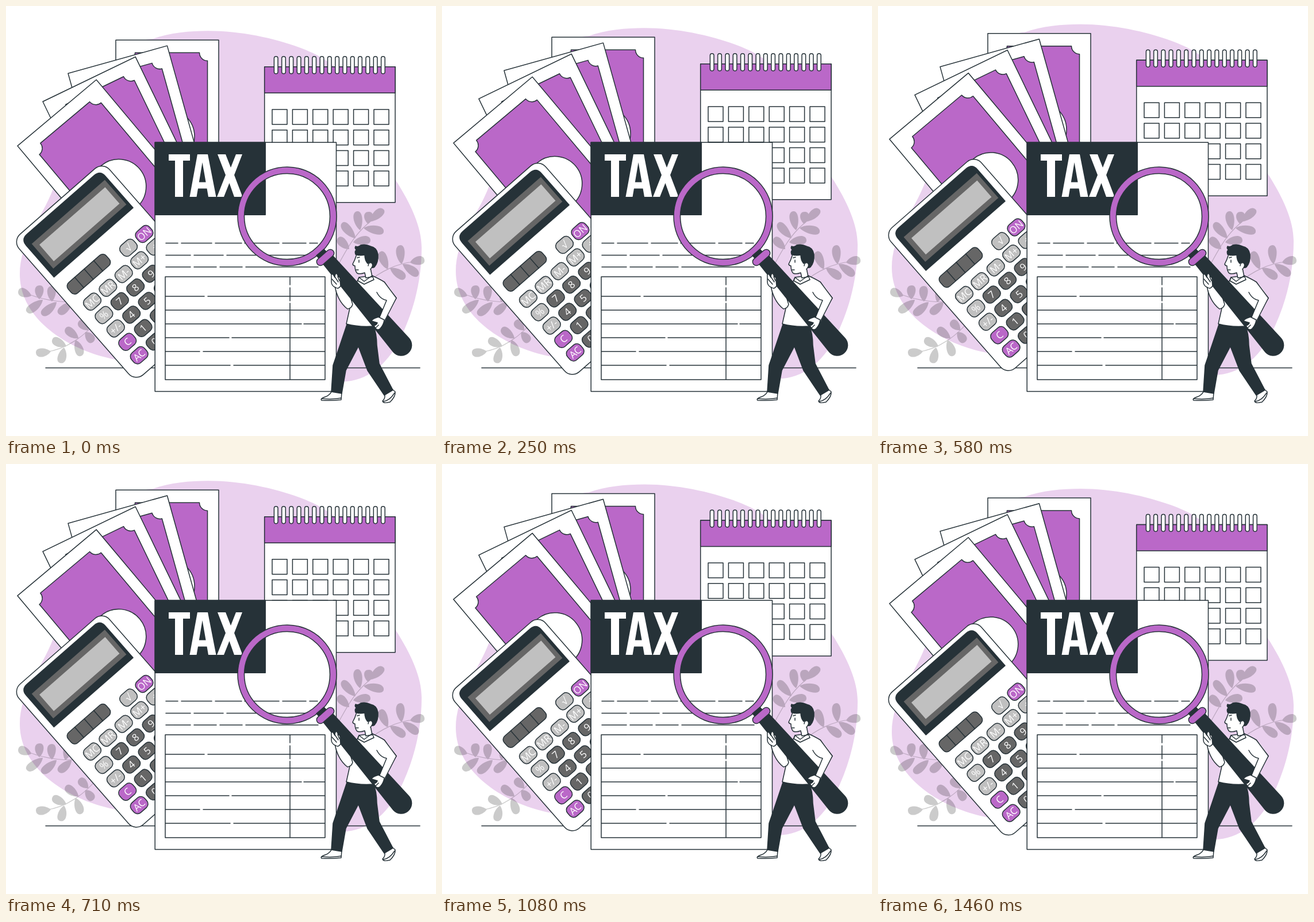
Recreate the animation shown at these times as an HTML page. Size 748 px wide and 748 px high, loop 1.5 s.

```html
<!DOCTYPE html>
<html lang="en">
<head>
<meta charset="utf-8">
<title>Tax</title>
<style>
  html, body { margin: 0; width: 100%; height: 100%; overflow: hidden; background: #fff; }
  svg { display: block; width: 100%; height: 100%; stroke: #263238; stroke-width: 1.5; fill: #fff; stroke-linejoin: round; stroke-linecap: round; }
  text { font: 17px "Open Sans", "Noto Sans", sans-serif; text-anchor: middle; stroke: none; fill: #fff; }
  .bare { stroke: none; }
  .line { fill: none; }
  .dark { fill: #263238; }
  .main { fill: #ba68c8; }
  .soft { fill: #ead1ee; stroke: none; }
  .mid { fill: #666; }
  .pale { fill: #c0c0c0; }
  .plant { stroke: #000; fill: #000; opacity: .2; stroke-width: 1.2; }
  .plant .leaf { stroke: none; }
</style>
</head>
<body>
<svg id="stage" viewBox="0 0 748 748"></svg>
<script>
const range = (n, draw) => Array.from({ length: n }, (_, i) => draw(i)).join('');
const rect = (x, y, w, h, cls = '', r = 0) =>
  `<rect x="${x}" y="${y}" width="${w}" height="${h}" rx="${r}" class="${cls}"/>`;
const path = (d, cls = '') => `<path d="${d}" class="${cls}"/>`;
const group = (transform, body) => `<g transform="${transform}">${body}</g>`;
const floating = body => `<g class="float">${body}</g>`;

// A leaf runs from its base on the stem to its tip.
function leaf([x, y, tipX, tipY]) {
  const len = Math.hypot(tipX - x, tipY - y);
  const angle = Math.atan2(tipY - y, tipX - x) * 180 / Math.PI;
  return group(`translate(${x} ${y}) rotate(${angle})`,
    path(`M0 0C${len * .3} -10 ${len} -12 ${len} 0C${len} 10 ${len * .3} 8 0 0Z`, 'leaf'));
}
const plant = (stem, leaves) =>
  `<g class="plant">${path(stem, 'line')}${leaves.map(leaf).join('')}</g>`;

const plants = [
  plant('M575 455C590 430 603 397 640 370', [
    [633, 375, 657, 354], [630, 379, 632, 358], [616, 390, 611, 357], [622, 386, 657, 393],
    [608, 404, 585, 377], [604, 411, 634, 407], [597, 423, 578, 403]]),
  plant('M630 480C650 463 680 447 710 445', [
    [703, 446, 728, 442], [688, 449, 686, 416], [690, 449, 717, 469], [664, 458, 652, 427],
    [668, 456, 694, 474]]),
  plant('M140 512C110 518 70 514 36 500', [
    [44, 504, 22, 494], [58, 510, 59, 486], [64, 511, 36, 532], [80, 514, 80, 487],
    [88, 515, 62, 537], [103, 515, 111, 488], [114, 515, 91, 535]]),
  plant('M160 545C140 572 105 598 68 602', [
    [78, 601, 52, 603], [101, 594, 94, 621], [105, 592, 81, 579], [121, 581, 130, 609],
    [126, 578, 104, 560], [138, 567, 151, 585], [143, 564, 128, 547]])
].join('');

const blob = path('M352 43C430 43 515 68 553 92C640 150 640 240 678 303C705 345 723 385 723 420C723 478 709 532 684 582C662 624 628 653 585 653C480 650 400 622 200 616C130 607 24 555 24 466C24 410 62 370 82 318C110 220 180 60 255 57C285 46 320 43 352 43Z', 'soft');

const bill = (x, y, angle) => group(`translate(${x} ${y}) rotate(${angle})`,
  rect(0, 0, 179, 335) +
  path('M33.5 22H145.5A14 14 0 0 0 159.5 36V299A14 14 0 0 0 145.5 313H33.5A14 14 0 0 0 19.5 299V36A14 14 0 0 0 33.5 22Z', 'main') +
  '<circle cx="89.5" cy="167.5" r="47.5"/>');
const bills = bill(191, 59, 0) + bill(108, 117, -15.6) + bill(64, 166, -25.8) + bill(20, 243, -40);

const calendar = rect(449.7, 105.5, 227.3, 236) + rect(449.7, 105.5, 227.3, 45.5, 'main') +
  range(15, i => rect(466.4 + i * 13.3, 87.5, 6.6, 30, '', 3.3)) +
  range(24, i => rect(463 + i % 6 * 35.4, 179.7 + Math.floor(i / 6) * 35.7, 26, 26));

function key(label, x, y) {
  const cls = /^(ON|A?C)$/.test(label) ? 'main' : /^\d$/.test(label) ? 'mid' : 'pale';
  return group(`translate(${x} ${y})`,
    rect(-15, -11.5, 30, 23, cls, 8.5) + `<text y="6">${label}</text>`);
}
const keyRows = ['   √ ON', 'MC MR M- M+ ÷', '% 7 8 9', '+/- 4 5 6', 'C 1 2 3', 'AC 0'];
const rowY = [-29, 0, 31, 62, 93, 124];
const keys = keyRows.map((row, r) =>
  row.split(' ').map((label, c) => label && key(label, c * 36.4, rowY[r])).join('')).join('');
const calculator = group('translate(150 514) rotate(-41.2)',
  rect(-35, -171, 209, 325, '', 18) +
  path('M-22 -76V-149Q-22 -163 -8 -163H147Q161 -163 161 -149V-76Z', 'dark') +
  rect(-13, -145, 169, 57, 'mid bare') + rect(-4, -135, 152, 38, 'pale bare') +
  rect(-17, -52, 88, 24, 'mid', 8) + path('M5 -52v24M27 -52v24M49 -52v24', 'line') + keys);

const lettering = `<g role="img" aria-label="TAX">` + path(
  'M283 258H320V269H308V332H294V269H283Z' +
  'M333 258H351L365.5 332H352L349.5 317.5H334L331.5 332H319.5ZM341.6 272L335.8 306.5H347.6Z' +
  'M368 258H382L391 281L400 258H411L397 294L411.5 332H397L388.5 308L379 332H367L382 294Z', 'bare') + '</g>';

const page = rect(259.2, 237.2, 315.3, 433.3) + rect(259.2, 237.2, 192, 126, 'dark') + lettering +
  path('M278 412.5H299M305 412.5H358M364 412.5H410M415 412.5H475M481 412.5H522M528 412.5H542' +
    'M278 433.5H321M327 433.5H378M384 433.5H435M441 433.5H542' +
    'M278 454H321M327 454H366M372 454H411M417 454H543', 'line') +
  path('M277 471H555V650H277Z' +
    'M277 505H345M351 505H555M277 529H555M277 553H514M518 553H555M277 577H388M393 577H555' +
    'M277 601H337M343 601H555M277 625H390M396 625H555M494 471V485M494 490V513M494 517V650', 'line');

const ring = path('M403 366a86 86 0 1 0 172 0a86 86 0 1 0 -172 0ZM414.5 366a74.5 74.5 0 1 1 149 0a74.5 74.5 0 1 1 -149 0Z', 'main');
const handle = path('M540 434L553 423L562 433L549 444Z', 'dark') +
  path('M552 449L568 434L701 578A18 18 0 0 1 674 602Z', 'dark') +
  group('translate(555.5 437.5) rotate(-41)', rect(-18, -6.5, 36, 13, 'main', 6.5));

const manBody =
  path('M567 669L584 672L583 685Q566 687 549 686Q546 683 555 680Q564 677 567 669Z') +
  path('M549 683Q567 685 583 682', 'line') +
  path('M658 674L671 666L677 671Q678 679 668 689Q656 692 655 687Q661 682 658 674Z') +
  path('M656 688Q667 687 676 673', 'line') +
  path('M594 551L639 556Q645 570 645 590L649 622L673 668L658 677L629 634L613 592L591 634L584 674L566 671L569 625Q579 596 594 551Z', 'dark') +
  path('M614 472L606 490L598 526L592 553Q614 559 640 557L657 545L679 508L658 480Q650 475 637 469Z') +
  path('M572 487Q577 514 594 527Q601 526 603 519L597 500L584 481Z') +
  path('M610 432Q607 442 603 449Q604 452 607 452Q607 461 611 465Q616 467 624 464L626 473L637 471L634 456L641 449L637 432Z') +
  path('M608 432Q606 426 610 424Q606 422 608 418Q613 420 617 416Q626 414 634 418Q645 420 647 432Q648 446 641 454Q636 457 634 452Q633 445 629 448Q624 442 624 433Q615 435 608 432Z', 'dark') +
  path('M630 452q1 -7 6 -5q4 4 -2 11') +
  path('M614 442v4M611 438l4 -1M609 459h4M614 472L623 479L637 469L640 476L623 484L612 478Z', 'line');

const hands =
  path('M566 471Q565 465 569 467L572 472Q572 464 576 466L578 471Q582 472 581 476L582 487Q578 493 574 490Q566 487 566 480Z') +
  path('M567 475l8 9M572 471l6 9M577 471l3 7', 'line') +
  path('M647 487Q648 501 663 511L650 541L659 548L679 508Q668 489 658 480Z', 'bare') +
  path('M645 498Q651 510 662 512L650 541M658 480L679 508L659 547', 'line') +
  path('M648 541L658 546Q657 554 651 561Q647 565 643 561L640 556Q645 555 646 551L636 548Q637 544 648 541Z') +
  path('M643 560l5 -5', 'line');

const stage = document.getElementById('stage');
stage.innerHTML = floating(blob) + plants + path('M69 629.5H720', 'line') +
  floating(bills + calendar + calculator) + page + manBody + ring + handle + hands;

// The floating parts rise and sink linearly, at 24 steps per second.
const LOOP = 1500, STEPS = 36, RISE = 14.96, REST = .5;
const floats = stage.querySelectorAll('.float');
function frame(now) {
  const step = Math.floor(now % LOOP / LOOP * STEPS + .1) % STEPS;
  const phase = (step + .25) / STEPS;
  const y = REST - RISE * (1 - Math.abs(1 - 2 * phase));
  floats.forEach(part => part.setAttribute('transform', `translate(0 ${y})`));
  requestAnimationFrame(frame);
}
frame(performance.now());
</script>
</body>
</html>
```
